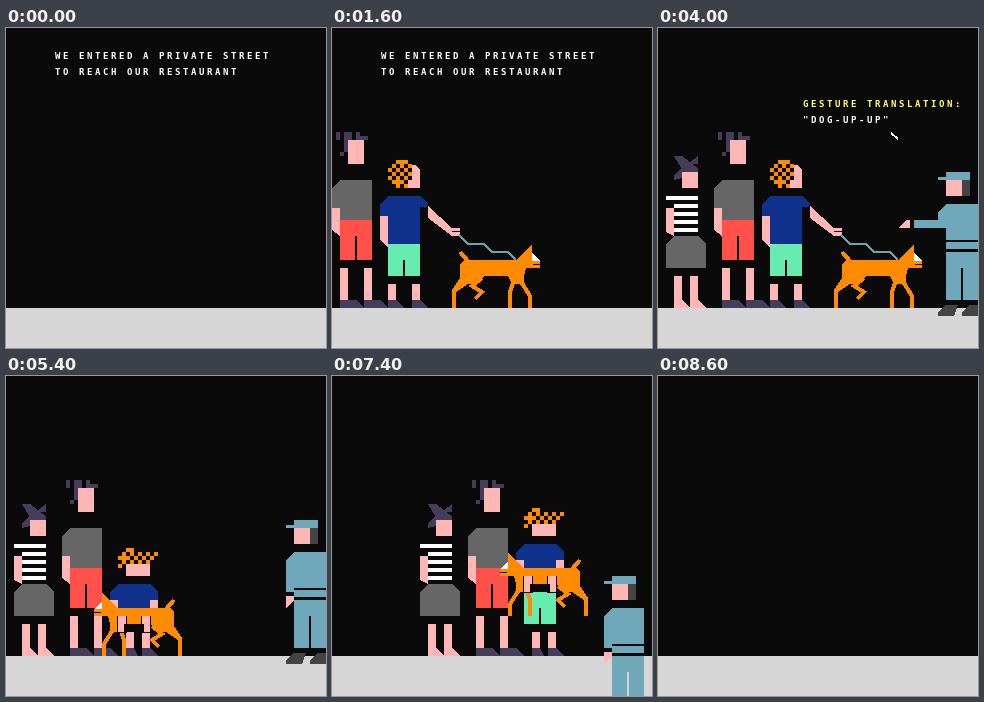
Animation of 320x320 px, one loop 8800 ms. Source, as an HTML page:

```html
<!DOCTYPE html>
<html lang="en">
<head>
<meta charset="utf-8">
<title>Private street</title>
<style>
html, body { margin: 0; width: 100%; height: 100%; overflow: hidden; background: #0a0a0a; }
svg { display: block; width: 100vw; height: 100vh; shape-rendering: crispEdges; }
text { font: bold 9px "DejaVu Sans Mono", monospace; letter-spacing: 2.58px; fill: #fff; }
.skin { fill: #ffb7b5; }
.gray { fill: #666; }
.plum { fill: #463c5c; }
.blue { fill: #10318c; }
.mint { fill: #66ecae; }
.red { fill: #ff504a; }
.fur { fill: #ff8c00; }
.teal { fill: #6fa8bb; }
.dark { fill: #444; }
.ink { fill: #0a0a0a; }
.white { fill: #fff; }
.line { fill: none; stroke: #ff8c00; stroke-width: 4; }
</style>
</head>
<body>
<svg viewBox="0 0 320 320">
  <defs>
    <pattern id="check" width="8" height="8" patternUnits="userSpaceOnUse">
      <path class="fur" d="M0 4h4v4h-4zM4 0h4v4h-4z"/>
    </pattern>
    <g id="dog">
      <path class="line" d="M184 224L192 233" stroke-width="3"/>
      <path class="line" d="M206 250L196 258L206 264L199 271M238 252L234 264V280M244 252L254 268V280"/>
      <path class="fur" d="M184 236L188 232H240L256 217V225L264 233V240H250L248 248V256H236L232 248H208L200 256H192L180 264V280H176V262L184 250Z"/>
      <path class="white" d="M256 225L264 233H256Z"/>
      <path class="ink" d="M257 236h7v1h-7z"/>
    </g>
    <g id="guardBase">
      <path class="teal" d="M288 144H312V152H280V149H288ZM288 176H320V212H288ZM288 214H320V221H288ZM288 224H320V272H305V240H303V272H288Z"/>
      <path class="skin" d="M288 152h16v16h-16z"/>
      <path class="dark" d="M304 152h8v16h-8zM280 288V284L288 277H300L296 288ZM304 288V284L312 277H320V288Z"/>
    </g>
  </defs>
  <path fill="#d6d6d6" d="M0 280h320v40H0z"/>

  <g id="group">
    <!-- woman -->
    <path class="plum" d="M16 128H24L32 134L40 128V136H34L40 140V144H24V150L16 152V148L23 140Z"/>
    <path class="skin" d="M24 144h16v16h-16zM8 180h8v28l-8-4zM16 248h8v24l8 8h-16zM32 248h8v24l8 8h-16z"/>
    <path class="white" d="M8 168h32v4h-32zM16 176h24v4h-24zM16 184h24v4h-24zM16 192h24v4h-24zM16 200h24v4h-24z"/>
    <path class="gray" d="M16 208H40L48 216V240H8V216Z"/>
    <!-- man -->
    <path class="plum" d="M60 104h4v8h-4zM68 104h8v4h-4v16h-4zM80 104h4v8h-4zM88 108h4v4h-4zM72 108h4v4h-4zM84 108h4v4h-4zM64 124h4v4h-4z"/>
    <path class="skin" d="M72 112h16v24h-16zM56 180h8v28l-8-6zM64 240h8v32h-8zM88 240h8v32h-8z"/>
    <path class="gray" d="M64 152H96V192H64V180H56V160Z"/>
    <path class="red" d="M64 192h32v40h-15v-24h-2v24h-15z"/>
    <path class="plum" d="M64 272h16l8 8h-24zM88 272h16l8 8h-24z"/>

    <g id="walker">
      <path class="skin" d="M128 137H140L144 142V160H128ZM104 188h8v32l-8-8zM152 178L176 200H184V203H176V204H184V208H176L152 190ZM112 256h8v16h-8zM136 256h8v16h-8z"/>
      <path class="ink" d="M124 136h12v16h-4v8h-8z"/>
      <path fill="url(#check)" d="M120 132h16v20h-4v8h-12v-4h-8v-20h8z"/>
      <path class="fur" d="M120 132h12v4h-12zM112 140h4v4h-4zM120 152h4v4h-4z"/>
      <path class="blue" d="M112 168H144L152 176L149 180L144 178V216H112V188H104V176Z"/>
      <path class="mint" d="M112 216h32v32h-15v-16h-2v16h-15z"/>
      <path class="plum" d="M112 272h8l8 8h-16zM136 272h8l8 8h-16z"/>
      <use href="#dog"/>
      <path fill="none" stroke="#6fa3ab" stroke-width="2" d="M183 207L192 216H208L216 224H232L240 232"/>
    </g>

    <g id="lifter">
      <path class="skin" d="M120 256h8v16h-8zM136 256h8v16h-8z"/>
      <path class="plum" d="M120 272h8l4 8h-12zM136 272h8l8 8h-16z"/>
      <path id="shorts" class="mint" d="M112 216h32v32h-15v-16h-2v16h-15z"/>
      <g id="upper">
        <path class="skin" d="M120 144h24v16h-24zM104 184h8v8h-8zM144 184h8v8h-8z"/>
        <path class="ink" d="M120 144h24v4h-24z"/>
        <path fill="url(#check)" d="M112 136h8v-4h8v4h24v8h-4v4h-28v4h-8z"/>
        <path class="fur" d="M120 132h8v4h-8zM116 140h4v4h-4z"/>
        <path class="blue" d="M112 168H144L152 176V184H144V192H112V184H104V176Z"/>
        <use href="#dog" transform="matrix(-1 0 0 1 352 -40)"/>
        <path class="ink" d="M111 200h10v17h-10zM135 200h10v17h-10z"/>
        <path class="skin" d="M112 200h8v8h-2v8h-6zM136 200h8v16h-6v-8h-2z"/>
      </g>
    </g>
  </g>

  <g id="runner">
    <path class="ink" d="M168 224h32v96h-32z"/>
    <path class="teal" d="M176 200H200V205H208V208H176ZM168 232H200L208 224V208H216V232L200 248V268H176L164 266L168 262V248L160 256L162 264L152 260V248ZM168 271H200V277H168ZM168 280H200V320H185V296H183V320H168Z"/>
    <path class="dark" d="M176 208h8v16h-8z"/>
    <path class="skin" d="M184 208h16v16h-16zM208 204V200L216 193V204ZM152 268h8v4l-8 8z"/>
  </g>

  <g id="guard">
    <use href="#guardBase"/>
    <g id="down">
      <path class="teal" d="M288 176V216H280V184Z"/>
      <path class="skin" d="M280 220h8v4l-8 8z"/>
    </g>
    <g id="point">
      <path class="teal" d="M288 176V200H256V192H280V184Z"/>
      <path class="skin" d="M241 199L248 192H252V200H241Z"/>
    </g>
    <g id="raise">
      <path class="teal" d="M288 176V200H280L256 176L262 170L280 186Z"/>
      <path class="skin" d="M246 166V160L252 163L259 170L254 174Z"/>
    </g>
  </g>

  <g id="say1"><text x="49" y="31">WE ENTERED A PRIVATE STREET</text><text x="49" y="47">TO REACH OUR RESTAURANT</text></g>
  <text id="say2" x="49" y="31">WHEN A GUARD RAN AFTER US</text>
  <g id="say3">
    <text x="145" y="79" style="fill:#ffff70">GESTURE TRANSLATION:</text>
    <text x="145" y="95">"DOG-UP-UP"</text>
    <path fill="none" stroke="#fff" stroke-width="2" d="M233 105L240 111"/>
  </g>
  <text id="say4" x="49" y="31">SO</text>
</svg>
<script>
const STEP = 200, LOOP = 8800;
const el = id => document.getElementById(id);
const show = (id, on) => el(id).style.display = on ? "" : "none";
const move = (id, x, y) => el(id).setAttribute("transform", `translate(${x} ${y})`);

function draw(s) {
  const within = (a, b) => s >= a && s <= b;

  // The family walks in, slows down, waits and walks out
  move("group", Math.min(32 * s - 280, 16 * s - 184, 0) + Math.max(0, 40 * (s - 35)), 0);
  const sink = Math.max(0, Math.min(40, 40 - 16 * (s - 32)));
  show("walker", s < 27);
  show("lifter", s >= 27);
  show("shorts", sink < 40);
  move("upper", 0, sink);

  // The guard runs past, steps up, gestures and leaves
  show("runner", within(10, 16));
  move("runner", 52 * (s - 14), 0);
  const leave = Math.max(0, s - 36);
  show("guard", s >= 17);
  move("guard", -8 * leave, s === 17 ? 56 : 56 * leave);
  const gesture = within(19, 25);
  show("down", !gesture);
  show("point", gesture && s % 2 === 0);
  show("raise", gesture && s % 2 === 1);

  show("say1", s < 10);
  show("say2", within(11, 18));
  show("say3", within(20, 25));
  show("say4", within(30, 33));
}

function tick() {
  draw(Math.floor(performance.now() % LOOP / STEP));
  requestAnimationFrame(tick);
}
tick();
</script>
</body>
</html>
```
